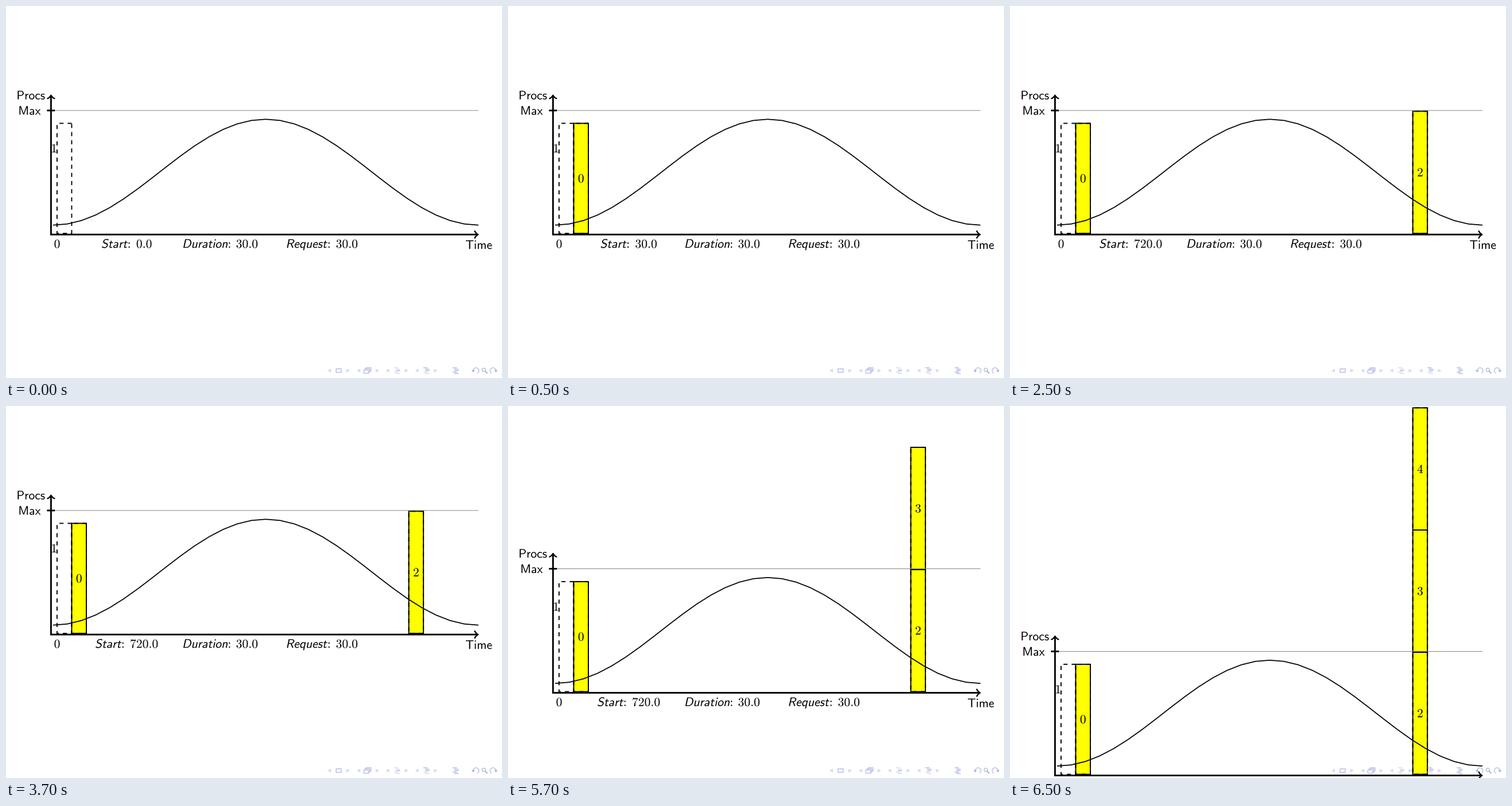
Animation, 864 px wide and 648 px high, one loop 8 s. Source, as a matplotlib script:

```python
import numpy as np
import matplotlib.pyplot as plt
from matplotlib.animation import FuncAnimation
from matplotlib.patches import Arc, Circle, PathPatch, Polygon, Rectangle
from matplotlib.path import Path
from matplotlib.textpath import TextPath
from matplotlib.transforms import Affine2D

W, H, DPI = 864, 648, 100
PX = 72 / DPI
FONT_PX = 21.6
THIN, THICK, AXIS = 0.95, 1.9, 2.85

LEFT, RIGHT, BASE, TOP = 78.4, 823, 398.1, 154.3
MAX_Y = 182
BAR_BOTTOM = 396.1
T0, T_SCALE = 88.9, 0.851

LIGHT, NAV = "#d6d6ef", "#adade0"

# number, start time, top and bottom of each job, in order of arrival
JOBS = [(0, 30, 204.4, BAR_BOTTOM)] + [
    (n, 720, BAR_BOTTOM - (n - 1) * 212.8, BAR_BOTTOM - (n - 2) * 212.8)
    for n in (2, 3, 4)
]
STARTS = [0, 30, 720, 720, 720]
SHIFTS = [0, 0, 0, 101.5, 245.5]

plt.rcParams["mathtext.fontset"] = "cm"
plt.rcParams["toolbar"] = "None"

fig = plt.figure(figsize=(W / DPI, H / DPI), dpi=DPI, facecolor="white")
ax = fig.add_axes([0, 0, 1, 1])


def line(xs, ys, width, color="black", cap="butt"):
    ax.plot(xs, ys, lw=width * PX, color=color, solid_capstyle=cap,
            solid_joinstyle="miter", snap=False)


def outline(patch, width, color="black", **style):
    patch.set(fill=False, lw=width * PX, edgecolor=color, snap=False, **style)
    ax.add_patch(patch)


def text(x, baseline, string, align="center", slanted=False):
    """Place sans text by the left, centre or right of its ink."""
    glyphs = TextPath((0, 0), rf"$\mathsf{{{string}}}$", size=FONT_PX)
    if slanted:
        glyphs = glyphs.transformed(Affine2D([[1, 0.2126, 0], [0, 1, 0], [0, 0, 1]]))
    box = glyphs.get_extents()
    anchor = {"left": box.x0, "center": (box.x0 + box.x1) / 2, "right": box.x1}[align]
    place = Affine2D().translate(-anchor, 0).scale(1, -1).translate(x, baseline)
    ax.add_patch(PathPatch(glyphs.transformed(place), fc="black", lw=0))


def arrow_tip(x, y, angle):
    a = 0.28 * 2.372 + 0.3 * AXIS
    points = a * np.array([(-3, 4), (-2.75, 2.5), (0, 0.25), (0.75, 0),
                           (0, -0.25), (-2.75, -2.5), (-3, -4)])
    path = Path(points, [Path.MOVETO] + [Path.CURVE4] * 6)
    place = Affine2D().translate(-0.75 * a - 0.4 * AXIS, 0).rotate_deg(angle).translate(x, y)
    outline(PathPatch(path.transformed(place)), 0.8 * AXIS,
            capstyle="round", joinstyle="round")


def triangle(x, y, direction, size=3, color=LIGHT):
    ax.add_patch(Polygon([(x + direction * size, y), (x - direction * size, y - size),
                          (x - direction * size, y + size)], fc=color, lw=0))


def nav_lines(x, dark):
    for k, (indent, y) in enumerate(zip((0, 3, 3, 0, 3),
                                        (630.2, 632.7, 635.2, 637.7, 640.2))):
        line([x - 5 + indent, x + 2.5 + indent], [y, y], 1.3,
             NAV if k in dark else LIGHT)


def navigation():
    y = 635.2
    for left, right in ((563, 596), (614, 647), (664.5, 697.5), (715.5, 748.5)):
        triangle(left, y, -1)
        triangle(right, y, 1)
    outline(Rectangle((575, 632), 9, 6.2), 1.2, NAV)
    for k in (2, 1, 0):
        ax.add_patch(Rectangle((623.3 + 2 * k, 634 - 2 * k), 8.6, 5.8, fc="white",
                               ec=NAV, lw=1.1 * PX, snap=False))
    nav_lines(681, {2})
    nav_lines(732, {0, 1, 2})
    nav_lines(783, range(5))

    for x, side, span in ((818.8, -1, (180, 420)), (848.4, 1, (120, 360))):
        outline(Arc((x, y), 10, 10, theta1=span[0], theta2=span[1]), 1.1, NAV)
        tip = x + side * 5
        ax.add_patch(Polygon([(tip - 3, y - 1), (tip + 3, y - 1), (tip, y + 3)],
                             fc=NAV, lw=0))
    outline(Circle((832.3, 633.8), 3), 1.2, NAV)
    line([834.6, 838], [636, 639.6], 2, NAV, "round")


def axes(dy):
    line([LEFT, RIGHT], [MAX_Y + dy] * 2, THIN, "0.5")
    line([LEFT, LEFT, RIGHT - 2.2], [TOP + 2.2 + dy, BASE + dy, BASE + dy], AXIS)
    arrow_tip(LEFT, TOP + dy, -90)
    arrow_tip(RIGHT + 0.5, BASE + dy, 0)
    line([71.4, 85.2], [MAX_Y + dy] * 2, AXIS)
    text(44, 162.8 + dy, "Procs")
    text(42, 189.5 + dy, "Max")
    text(823.7, 423.3 + dy, "Time")
    text(89, 421.3 + dy, "0")


def load_curve(dy):
    x = np.linspace(82, 823, 31)
    y = 289.5 + 92.2 * np.cos(2 * np.pi * (x - 82) / 741)
    line(x, y + dy, 1.75)


def dashed_box(start, top, bottom):
    width = 30 * T_SCALE
    box = Rectangle((T0 + start * T_SCALE + width, top), -width, bottom - top)
    outline(box, THICK, linestyle=(0, (3.74, 3.74)))


def job(number, start, top, bottom, dy):
    x, width = T0 + start * T_SCALE, 30 * T_SCALE
    ax.add_patch(Rectangle((x, top + dy), width, bottom - top, fc="yellow",
                           ec="black", lw=THICK * PX, snap=False))
    dashed_box(start, top + dy, bottom + dy)
    text(x + width / 2, (top + bottom) / 2 + 7.1 + dy, str(number))


def caption(label, center, half, colon, value, dy):
    baseline = 421.3 + dy
    text(center - half, baseline, label, "left", slanted=True)
    text(center - half + colon, baseline, ":", "left")
    text(center + half, baseline, f"{value:.1f}", "right")


def draw(frame):
    step = (frame + 3) // 4
    dy, start = SHIFTS[step], STARTS[step]
    ax.clear()
    ax.set(xlim=(0, W), ylim=(H, 0))
    ax.axis("off")

    navigation()
    axes(dy)
    load_curve(dy)
    dashed_box(0, 204.4 + dy, BAR_BOTTOM + dy)
    text(83.7, 255 + dy, "1")
    for entry in JOBS[:step]:
        job(*entry, dy)

    half = 43.3 + 5.4 * (len(str(start)) - 1)
    caption("Start", 210.2, half, 46.4, start, dy)
    caption("Duration", 373.5, 64.6, 79.2, 30, dy)
    caption("Request", 550.7, 61.4, 72.2, 30, dy)
    return []


anim = FuncAnimation(fig, draw, frames=16, interval=500, init_func=lambda: [],
                     repeat=True, repeat_delay=0, blit=False)
plt.show()
```
